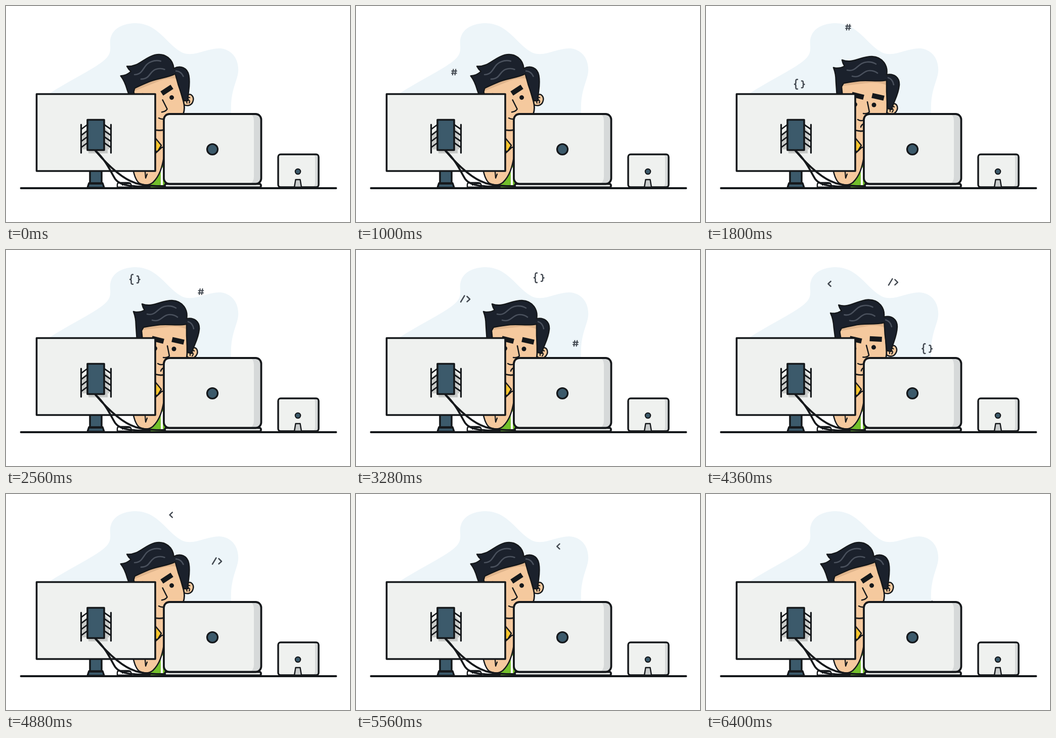
Write an HTML page that moves like this. It is 680 px wide and 428 px high and loops after 6640 ms.

```html
<!DOCTYPE html>
<html lang="en">
<head>
<meta charset="utf-8">
<title>Developer at work</title>
<style>
  html, body { margin: 0; width: 100%; height: 100%; overflow: hidden; background: #fff; }
  svg { display: block; width: 100vw; height: 100vh; }
  .ink { stroke: #15181b; stroke-linecap: round; stroke-linejoin: round; }
  .line { fill: none; }
  .steel { fill: #3c5a6b; }
  .panel { fill: #eff1ef; }
  .skin { fill: #f5c99e; }
  .shade { fill: #d6d9d9; }
  .sign { fill: none; stroke: #434951; stroke-width: 2.5; stroke-linecap: round; stroke-linejoin: round; }
</style>
</head>
<body>
<svg viewBox="0 0 680 428">
  <path fill="#edf5f9" d="M85 174C120 151 160 132 187 113C205 100 207 92 206 78C203 50 224 35 255 34C302 34 318 78 350 93C373 101 396 84 422 84C446 85 461 105 459 130C457 151 443 166 445 214V230H85Z"/>

  <!-- body -->
  <path class="skin" d="M285 225H330V290H285Z"/>
  <path fill="#dfae83" d="M290 241H316V247Q304 252 290 246Z"/>
  <path class="ink" fill="#ffc72e" stroke-width="2.5" d="M284 248L307 276L300 288H284Z"/>
  <path fill="#73c02b" d="M280 359L300 325L312 312H324V359Z"/>
  <path stroke="#fff" stroke-width="4" d="M308 320V357"/>
  <path class="ink skin" stroke-width="2.5" d="M250 318Q254 342 262 350Q278 359 290 350C304 337 309 318 312 299V280H308Q302 286 294 293Z"/>
  <path class="ink line" stroke-width="2.2" d="M275 329L276 341L279 333"/>

  <g id="head">
    <path class="ink skin" stroke-width="2.5" d="M368 194C378 191 381 202 376 209C371 217 361 215 357 210V196Z"/>
    <path class="ink line" stroke-width="2.2" d="M364 209C363 201 368 197 372 200M368 203Q372 206 368 210"/>
    <path class="ink skin" stroke-width="2.8" d="M268 145H358V205C357 235 332 248 306 248C278 246 266 224 266 196Z"/>
    <path fill="#dfb48b" d="M269 148H357V157Q340 149 316 153L272 158Z"/>
    <path class="ink" fill="#1b212c" stroke-width="2.5" d="M252 122Q263 125 274 119Q270 113 269 107C290 115 305 100 328 100C350 101 360 119 357 136C372 133 383 142 382 157C380 178 371 188 367 205L359 203L357 170V147C337 151 318 145 297 149Q282 151 272 153L268 160L270 180H259L257 151Q257 134 252 122Z"/>
    <path class="line" stroke="#4a515d" stroke-width="2.6" stroke-linecap="round" d="M279 127C297 132 300 112 318 111Q328 110 336 115M289 139C307 144 309 128 323 128Q333 128 339 133M360 142Q369 145 371 156"/>
    <rect id="browLeft" fill="#15181b" x="-12" y="-5" width="24" height="10"/>
    <rect id="browRight" fill="#15181b" x="-12" y="-5" width="24" height="10"/>
    <circle fill="#15181b" cx="294.5" cy="195" r="4.5"/>
    <circle id="eye" fill="#15181b" cx="332" cy="196" r="4.5"/>
    <path class="ink line" stroke-width="2.5" d="M319 190L323 210Q319 214 311 213"/>
    <path id="smile" class="ink line" stroke-width="2.5" d="M300 225Q306 229 312 226M306 240Q307 235 313 233"/>
  </g>
  <path id="flatMouth" class="ink line" stroke-width="2.5" d="M302 222Q307 225 314 224"/>

  <g id="signs">
    <path class="sign" style="stroke-width:2.1" d="M-1.6 -5.5L-3.2 5.5M3.2 -5.5L1.6 5.5M-4.7 -2.1H5M-5 2.3H4.7"/>
    <path class="sign" d="M-4 -9.5Q-7.5 -10 -7.5 -6.5V-3Q-7.5 0 -10 0Q-7.5 0 -7.5 3V6.5Q-7.5 10 -4 9.5M4 -6.5Q7 -7 7 -4V-2Q7 0 9.5 0.3Q7 .5 7 2.5V4.5Q7 7.5 4 7"/>
    <path class="sign" d="M-9 6L-1.5 -6.5M3.5 -5L9 .5L3.5 5.5"/>
    <path class="sign" d="M2.7 -5L-2.5 0L2.7 5"/>
  </g>

  <!-- mouse -->
  <path class="ink" fill="#fff" stroke-width="2.5" d="M220 359V354Q220 350 225 350H242Q248 350 248 359Z"/>
  <path class="ink line" stroke-width="2" d="M230 355Q232 351 238 352H245"/>

  <!-- monitor -->
  <path class="ink steel" stroke-width="3.5" d="M166 325H189V352H166ZM164 351H191L194 360H161Z"/>
  <rect class="ink panel" stroke-width="3.6" x="60.5" y="174.5" width="234.5" height="152.5"/>
  <path fill="#c8cac8" d="M163 283H201V292H163ZM194 239L204 250V284H194ZM151 252L161 243V284H151Z"/>
  <g id="ribs" class="ink line" stroke-width="2.8"></g>
  <path class="ink line" stroke-width="3.2" d="M148.5 235V291M207.5 235V291"/>
  <rect class="ink steel" stroke-width="3.6" x="161" y="225.5" width="33" height="60"/>
  <path class="ink line" stroke-width="3.8" d="M177 287C199 307 207 329 216 343C226 357 252 358 284 358M177 287C199 313 229 344 260 352Q278 357 314 357"/>

  <!-- laptop -->
  <rect class="ink panel" stroke-width="3.8" x="314" y="352.5" width="190" height="7" rx="3"/>
  <rect class="panel" x="312" y="214" width="192.5" height="138.5" rx="11"/>
  <path class="shade" d="M483 214H494Q504 215 504 226V341Q504 352 494 352H483Q490 348 490 338V227Q490 217 483 214Z"/>
  <rect class="ink line" stroke-width="3.8" x="312" y="214" width="192.5" height="138.5" rx="11"/>
  <circle class="ink steel" stroke-width="3.2" cx="408" cy="284" r="10.5"/>

  <!-- tablet -->
  <rect class="panel" x="538" y="294" width="80" height="65" rx="5"/>
  <path class="shade" d="M607 294H613Q618 295 618 300V354Q618 359 613 359H607Q611 356 611 351V301Q611 296 607 294Z"/>
  <rect class="ink line" stroke-width="3.4" x="538" y="294" width="80" height="65" rx="5"/>
  <path class="ink" fill="#c9cccc" stroke-width="2.4" d="M572.5 344H581.5L584 359H570Z"/>
  <circle class="ink steel" stroke-width="2.2" cx="577" cy="328" r="5.2"/>

  <path class="ink" stroke-width="3.8" stroke-linecap="butt" d="M29.5 361H652.5"/>
</svg>
<script>
const LOOP = 6640;
const $ = id => document.getElementById(id);

// distance along the arc, x, y
const ARC = [
  [-60, 184, 215], [-25, 182, 180], [0, 185, 155], [26, 194, 131], [66, 216, 97], [107, 244, 67],
  [152, 281, 42], [176, 305, 38], [200, 328, 42], [236, 362, 55], [332, 417, 133],
  [387, 434, 185], [429, 446, 225], [465, 450, 260]
];

// time, distance along the arc
const TRIPS = [
  [[560, -45], [1000, 26], [1200, 57], [1800, 152], [3280, 387], [3660, 440]],
  [[1480, -50], [1800, 0], [3280, 236], [4360, 398], [4660, 440]],
  [[2560, -50], [3280, 66], [4360, 248], [4880, 332], [5560, 440]],
  [[3360, -50], [4360, 107], [4880, 198], [5300, 263], [5980, 355], [6400, 421], [6440, 430]]
];

const clamp = v => Math.min(1, Math.max(0, v));
const ease = v => v * v * (3 - 2 * v);

function segment(keys, v) {
  let i = 0;
  while (i < keys.length - 2 && v >= keys[i + 1][0]) i++;
  return i;
}

function linear(keys, v) {
  const i = segment(keys, v), [a, p] = keys[i], [b, q] = keys[i + 1];
  return p + (q - p) * clamp((v - a) / (b - a));
}

function smooth(keys, v, axis) {
  const i = segment(keys, v), a = keys[i], b = keys[i + 1];
  const span = b[0] - a[0], u = clamp((v - a[0]) / span);
  const slope = k => {
    const p = keys[Math.max(0, k - 1)], n = keys[Math.min(keys.length - 1, k + 1)];
    return (n[axis] - p[axis]) / (n[0] - p[0]) * span;
  };
  const w = 1 - u;
  return a[axis] * w * w * (1 + 2 * u) + slope(i) * u * w * w
       + b[axis] * u * u * (3 - 2 * u) - slope(i + 1) * u * u * w;
}

function place(el, x, y, angle = 0) {
  el.setAttribute('transform', `translate(${x} ${y}) rotate(${angle})`);
}

function poseHead(lean) {
  $('head').setAttribute('transform', `translate(0 ${-2 * lean}) rotate(${-15.5 * lean} 307 224)`);
  place($('browRight'), 340 - 7.6 * lean, 180 - 6.3 * lean, 13 - 31 * lean);
  place($('browLeft'), 300 - 7 * lean, 178 - 2 * lean, 14 + 10 * lean);
  place($('eye'), 5.7 * lean, -5.7 * lean);
  $('smile').style.opacity = lean < .5 ? 1 : 0;
  $('flatMouth').style.opacity = lean < .5 ? 0 : 1;
}

function draw(t) {
  const upright = ease(clamp((t - 1280) / 400)) - ease(clamp((t - 4240) / 400));
  poseHead(1 - upright);
  [...$('signs').children].forEach((sign, i) => {
    const trip = TRIPS[i], s = linear(trip, t);
    const active = t >= trip[0][0] && t < trip[trip.length - 1][0];
    sign.style.visibility = active ? 'visible' : 'hidden';
    place(sign, smooth(ARC, s, 1), smooth(ARC, s, 2));
  });
}

let ribs = '';
for (let y = 235; y <= 271; y += 12) ribs += `M161 ${y}L149 ${y + 9}M194 ${y}L207 ${y + 9}`;
$('ribs').innerHTML = `<path d="${ribs}"/>`;

const start = performance.now();
function tick() {
  const now = performance.now() - start;
  draw(Math.floor(now % LOOP / 40) * 40);
  requestAnimationFrame(tick);
}
tick();
</script>
</body>
</html>
```
